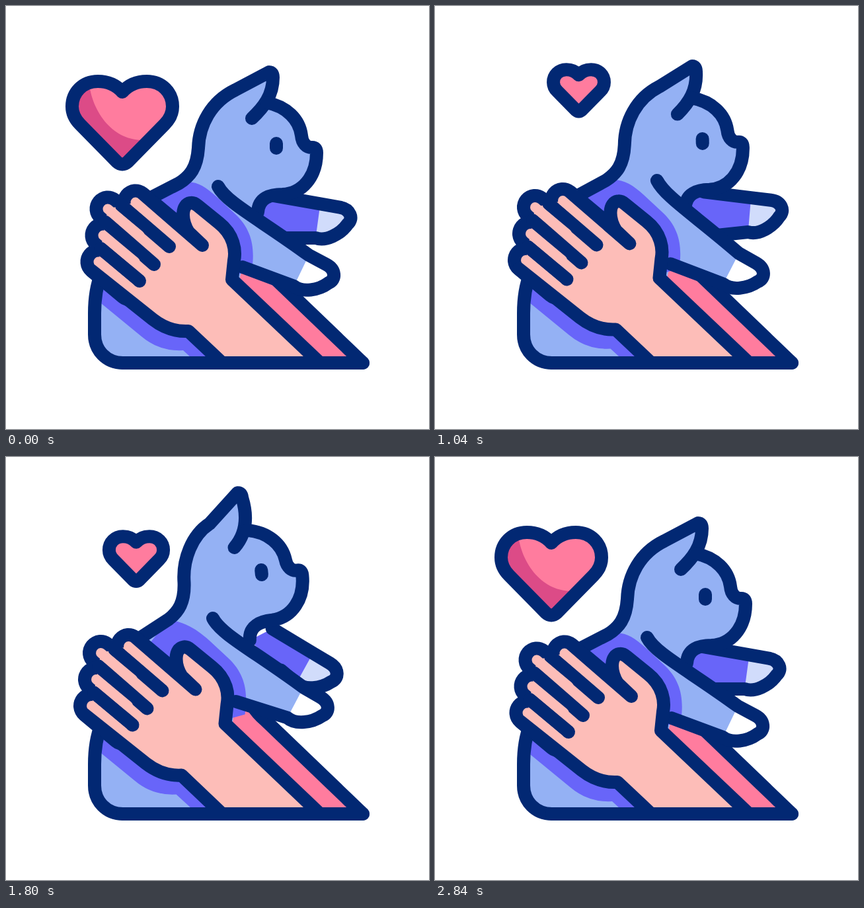
Animation, 640 px wide and 640 px high, one loop 3.4 s. Source, as an HTML page:

```html
<!DOCTYPE html>
<html lang="en">
<head>
<meta charset="utf-8">
<title>Cat in hand</title>
<style>
  html, body { margin: 0; width: 100%; height: 100%; overflow: hidden; background: #fff; }
  svg { display: block; width: 100vw; height: 100vh; }
  path { fill: none; stroke-linecap: round; stroke-linejoin: round; }
  .line { stroke: #022873; stroke-width: 20; }
  .finger { stroke: #022873; stroke-width: 55; }
  .strip { stroke: #fdbdb8; stroke-width: 15; }
  .blue { fill: #94b1f4; }
  .purple { fill: #6865f9; }
  .pink { fill: #ff7c9e; }
  .rose { fill: #dc4b87; }
  .skin { fill: #fdbdb8; }
  .white { fill: #fff; }
  .pale { fill: #d1dcfb; }
</style>
</head>
<body>
<svg id="stage" viewBox="0 0 640 640">
  <clipPath id="torso"><path d="M144,405C136,425 134,445 134,465V497C134,521 152,540 177,540H400V405Z"/></clipPath>
</svg>
<script>
const stage = document.getElementById('stage');
const LOOP = 3400;

function add(cls, d = '', parent = stage) {
  const el = document.createElementNS('http://www.w3.org/2000/svg', 'path');
  el.setAttribute('class', cls);
  el.setAttribute('d', d);
  parent.appendChild(el);
  return el;
}
const put = (el, d) => el.setAttribute('d', d);
const str = p => p[0].toFixed(2) + ',' + p[1].toFixed(2);
const clamp = v => Math.min(1, Math.max(0, v));

// Send every "x,y" pair of a path through a point function.
const warp = (d, f) => d.replace(/(-?[\d.]+),(-?[\d.]+)/g, (_, x, y) => str(f(+x, +y)));

// time, lean, hand shift, finger slide, shoulder x y, near paw x y angle, far paw x y angle
const KEYS = [
  [220, 0, 0, 0, 321, 273, 446, 400, 28, 471, 325, 10],
  [680, .62, 10, 1, 352, 286, 448, 440, 43, 479, 384, 41],
  [1040, -.19, -2.5, 0, 336, 264, 447, 397, 29.5, 475, 316, 7],
  [1300, -.74, -8, 0, 319, 250, 440, 379, 27, 455, 332, 32],
  [1800, -1, -10.5, 0, 313, 244, 437, 371, 30, 451, 319, 31],
  [2420, .16, .8, .1, 329, 278, 441, 417, 36, 470, 359, 29],
  [2840, 0, 0, 0, 321, 273, 446, 400, 28, 471, 325, 10]
];

function slope(i, c) {
  const a = KEYS[i - 1], b = KEYS[i + 1];
  return a && b ? (b[c] - a[c]) / (b[0] - a[0]) : 0;
}

// Smooth cubic through the key poses.
function pose(t) {
  t = Math.min(2840, Math.max(220, t));
  let i = 0;
  while (i < KEYS.length - 2 && t > KEYS[i + 1][0]) i++;
  const a = KEYS[i], b = KEYS[i + 1], w = b[0] - a[0], u = (t - a[0]) / w;
  const e = u * u * (3 - 2 * u);
  return a.map((v, c) => v + (b[c] - v) * e +
    w * u * (1 - u) * ((1 - u) * slope(i, c) - u * slope(i + 1, c)));
}

const HEART = 'M0,-46C-9,-56 -22,-62 -37,-62C-60,-62 -76,-45 -76,-24C-76,-13 -71,-4 -64,3L-8,60Q0,67 8,60L64,3C71,-4 76,-13 76,-24C76,-45 60,-62 37,-62C22,-62 9,-56 0,-46Z';
const SHADE = 'M-50,-58C-46,-20 -18,26 30,27L0,64L-64,3C-82,-12 -80,-50 -50,-58Z';
const NECK = 'M200,300L262,268C278,258 289,245 291,215C292,180 310,145 ';
const EAR_END = ' 390,153 372,170';
const FACE = '394,146C425,152 444,172 447,196C448,208 455,214 462,214Q470,213 470,222C470,258 448,284 418,285C400,285 382,290 381,312';
const PAW = '0,-26L30,-26C46,-26 54,-13 46,-3C38,14 18,29 2,26';
const SIDE = 'M144,405C136,425 134,445 134,465V497C134,521 152,540 177,540';
const HEEL = '129,400L222,474C240,488 258,493 276,492';
const THUMB = '342,414L345,385C348,370 345,346 322,328L290,302Q284,297 279,298C266,300 264,322 276,342L297,362L207,284';
const TIPS = [[196, 297], [154, 307], [147, 347], [140, 387]];
const GAPS = [[247, 364], [224, 391], [202, 416]];
const FLOATERS = [[217.5, 715], [135, 1057], [197, 1542]];

function makeHeart(shaded) {
  const fill = add('pink'), shade = shaded && add('rose'), line = add('line');
  return (x, y, k) => {
    const f = (a, b) => [x + a * k, y + b * k];
    const on = k > .001;
    put(fill, on ? warp(HEART, f) : '');
    if (shade) put(shade, on ? warp(SHADE, f) : '');
    put(line, on ? warp(HEART, f) : '');
    line.style.strokeWidth = 20 * Math.min(1, k / .02);
  };
}

const mainHeart = makeHeart(true);
const floaters = FLOATERS.map(() => makeHeart(false));

add('pink', 'M343,380L372,375Q380,388 392,398L540,540H475L343,414Z');
add('line', 'M372,375Q380,388 392,398L540,540');

const farLeg = add('purple'), farPaw = add('pale'), farLine = add('line');
const body = add('blue'), nearLeg = add('blue'), nearPaw = add('white');
const collar = add('purple'), band = add('purple');
band.setAttribute('clip-path', 'url(#torso)');
const back = add('line'), face = add('line'), eye = add('line'), nearLine = add('line');
add('line', SIDE);

const fingers = TIPS.map(() => add('finger'));
const palm = add('skin');
const gaps = GAPS.map(() => add('line'));
const strips = TIPS.map(() => add('strip'));
const heel = add('line'), thumb = add('line');
add('line', 'M177,540H540');

function drawHearts(t) {
  if (t < 1500) {
    const e = clamp((t - 220) / 420) ** 2;
    mainHeart(176, 176 - 100 * e, 1 - e);
  } else {
    const e = 1 - (1 - clamp((t - 2120) / 620)) ** 2;
    mainHeart(176, 255 - 79 * e ** 1.6, e);
  }
  FLOATERS.forEach(([x, start], i) => {
    const u = (t - start) / 560;
    const k = u > 0 && u < 1 ? .55 * Math.sin(Math.PI * u) ** 2.5 : 0;
    floaters[i](x, 255 - 219 * u, k);
  });
}

function spin(x, y, deg) {
  const c = Math.cos(deg * Math.PI / 180), s = Math.sin(deg * Math.PI / 180);
  return (a, b) => [x + a * c - b * s, y + a * s + b * c];
}

function draw(t) {
  const [, lean, h, slide, sx, sy, nx, ny, na, fx, fy, fa] = pose(t);
  const turn = spin(409 + 22.5 * lean, 211 + 37 * lean, 5.8 * lean);
  const head = (x, y) => turn(x - 409, y - 211);
  const bend = (x, y) => (p => [p[0] + 14 * lean * x, p[1] + 14 * lean * y]);
  const shift = (x, y) => [x + h, y + h];
  // The far ends of the hand slide further than the palm.
  const reach = (x, y, w = 1) => shift(x + 5.5 * slide * w, y + 5.5 * slide * w);

  drawHearts(t);

  // Legs
  const near = spin(nx, ny, na), far = spin(fx, fy, fa);
  const knee = near(0, -26), dx = knee[0] - sx, dy = knee[1] - sy;
  const elbow = str([358 + 10 * lean, 395 + 25 * lean]);
  const nearPad = warp(PAW, near), farPad = warp(PAW, far);
  const leg = 'M' + str([sx, sy]) + 'C' + str([sx + 12, sy + 24]) + ' ' +
    str([sx + .45 * dx, sy + .45 * dy + 2]) + ' ' + nearPad + 'L' + elbow;
  put(nearLeg, leg + 'Z');
  put(nearLine, leg);
  put(nearPaw, 'M' + nearPad + 'Z');

  const hip = str([sx + .75 * dx, sy + .75 * dy]);
  const farTop = 'M' + str(far(-72, -26)) + 'L' + farPad + 'L' + hip;
  put(farLeg, farTop + 'L' + str(head(381, 312)) + 'Z');
  put(farPaw, 'M' + farPad + 'Z');
  put(farLine, farTop);

  // Head and body
  const root = str(bend(.6, -.3)(head(347, 127)));
  const tipBend = bend(1, .75);
  const ear = 'L' + str(tipBend(head(398, 100))) + 'Q' + str(tipBend(head(404, 100))) + ' ' +
    str(tipBend(head(404, 108))) + 'C' + str(bend(.5, .4)(head(404, 135)));
  const spine = warp(NECK, head) + root + ear + warp(EAR_END, head);
  const front = warp(FACE, head);
  put(body, spine + 'L' + front + 'L' + elbow +
    'L320,540L177,540C152,540 134,521 134,497L134,465C134,445 136,425 144,405Z');
  put(back, spine);
  put(face, 'M' + front);
  put(eye, warp('M409,208L409,215', head));
  put(collar, 'M' + str(head(262, 268)) +
    warp('C285,262 300,272 318,288L346,314C372,338 377,365 372,400L300,420L222,300Z', shift));
  put(band, warp('M100,414L205,500Q232,523 268,521L292,543L340,543L276,480L130,390Z', shift));

  // Hand
  const side = warp(HEEL, (x, y) => reach(x, y, clamp((222 - x) / 93)));
  const top = warp(THUMB, (x, y) => reach(x, y, clamp((362 - y) / 60)));
  const ends = TIPS.map(([x, y]) => reach(x, y));
  put(palm, 'M' + side + 'L327,540L475,540L' + top + 'L' + ends.map(str).join('L') + 'Z');
  put(heel, 'M' + side + 'L327,540');
  put(thumb, 'M475,540L' + top);
  ends.forEach((p, i) => {
    const d = 'M' + str(p) + 'L' + str([p[0] + 48, p[1] + 40]);
    put(fingers[i], d);
    put(strips[i], d);
  });
  GAPS.forEach(([x, y], i) => {
    const a = ends[i], b = ends[i + 1];
    put(gaps[i], 'M' + str([(a[0] + b[0]) / 2, (a[1] + b[1]) / 2]) +
      'L' + str([x + h - 2 * slide, y + h - 2 * slide]));
  });
}

const began = performance.now();
function tick() {
  draw((performance.now() - began) % LOOP);
  requestAnimationFrame(tick);
}
tick();
</script>
</body>
</html>
```
